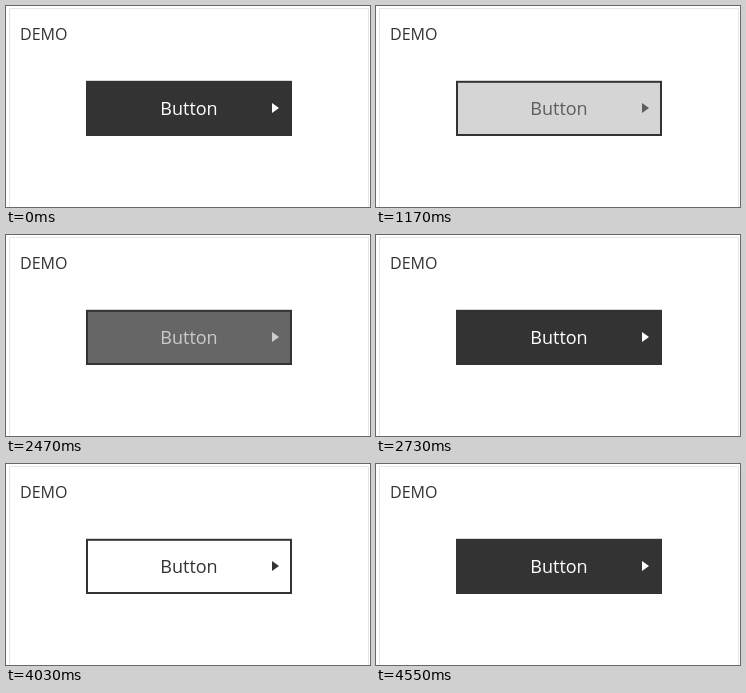
These frames come from a looping animation (364x201 px, 5.2 s). An HTML page:

```html
<!DOCTYPE html>
<html lang="en">
<head>
<meta charset="utf-8">
<title>Button demo</title>
<style>
  html, body { margin: 0; width: 100%; height: 100%; overflow: hidden; background: #fff; }
  svg { display: block; width: 364px; height: 201px; font-family: "Open Sans", sans-serif; }
</style>
</head>
<body>
<svg viewBox="0 0 364 201">
  <path d="M3.5 201V2.5H362.5V201" fill="none" stroke="#e6e6e6"/>
  <text x="14" y="34" font-size="16" fill="#333">DEMO</text>
  <rect id="face" x="81" y="75.8" width="204" height="53.2" fill="#333" stroke="#333" stroke-width="2"/>
  <g id="label" fill="#fff">
    <text x="183" y="109" font-size="18" text-anchor="middle">Button</text>
    <path d="M266 97L273 102L266 107Z"/>
  </g>
</svg>
<script>
const LOOP = 5200, STEP = 130, FADE = 300;
const DARK = 51, LIGHT = 255;

// Start time of each hover change and the state it leads to (1 = light face).
const changes = [[1022, 1], [2335, 0], [3687, 1], [4190, 0]];

const face = document.getElementById('face');
const label = document.getElementById('label');

const bezier = (a, b, u) => 3 * a * u * (1 - u) ** 2 + 3 * b * u * u * (1 - u) + u ** 3;

// CSS "ease": cubic-bezier(.25, .1, .25, 1)
function ease(x) {
  if (x >= 1) return 1;
  let low = 0, high = 1;
  for (let i = 0; i < 24; i++) {
    const mid = (low + high) / 2;
    if (bezier(.25, .25, mid) < x) low = mid; else high = mid;
  }
  return bezier(.1, 1, low);
}

function lightness(time) {
  let level = 0;
  for (const [start, goal] of changes) {
    if (time >= start) level = 1 - goal + (2 * goal - 1) * ease((time - start) / FADE);
  }
  return level;
}

function gray(level) {
  const v = Math.round(DARK + (LIGHT - DARK) * level);
  return `rgb(${v},${v},${v})`;
}

function draw(now) {
  const time = Math.floor((now % LOOP) / STEP) * STEP;
  const level = lightness(time);
  face.setAttribute('fill', gray(level));
  label.setAttribute('fill', gray(1 - level));
  requestAnimationFrame(draw);
}
requestAnimationFrame(draw);
</script>
</body>
</html>
```
